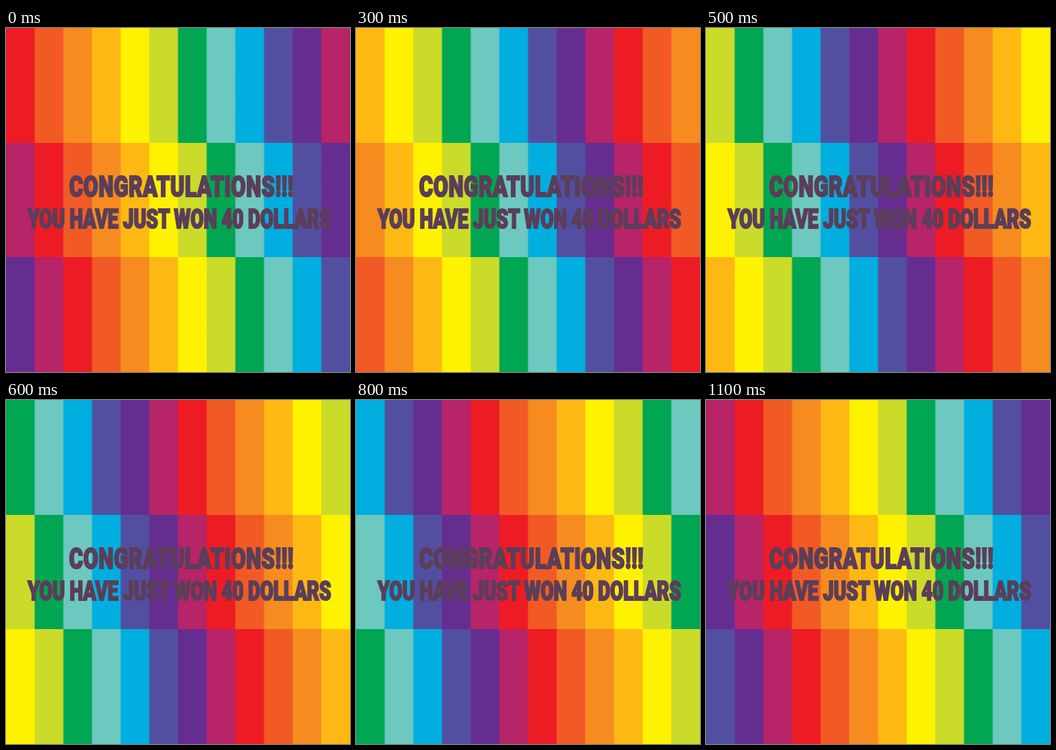
Write an HTML page with a canvas that moves like this. It is 500 by 500 pixels and loops after 1200 ms.

```html
<!DOCTYPE html>
<html lang="en">
<head>
<meta charset="utf-8">
<title>Congratulations</title>
<style>
  html, body { margin: 0; width: 100%; height: 100%; overflow: hidden; }
  canvas, svg { position: absolute; left: 0; top: 0; width: 500px; height: 500px; }
  text {
    font-family: Roboto, Inter, sans-serif;
    font-weight: 900;
    text-anchor: middle;
    fill: #5b3e59;
    stroke: #5b3e59;
    stroke-width: 2.2;
  }
  .title { font-size: 42.5px; letter-spacing: .65px; }
  .prize { font-size: 38px; letter-spacing: -.2px; }
</style>
</head>
<body>
<canvas width="500" height="500"></canvas>
<svg viewBox="0 0 500 500">
  <!-- one condensed style shared by both lines -->
  <text class="title" transform="translate(255 244.7) scale(.73 1)">CONGRATULATIONS!!!</text>
  <text class="prize" transform="translate(252 290.7) scale(.73 1)">YOU HAVE JUST WON 40 DOLLARS</text>
</svg>
<script>
  const colors = [
    '#ed1c24', '#f15a24', '#f68b1f', '#fdb813', '#fff200', '#cbdb2a',
    '#00a651', '#6dc8bf', '#00aedf', '#524fa1', '#662d91', '#b72467'
  ];
  const size = 500, rows = 3, count = colors.length, stepMs = 100;
  const soft = 1 / size; // half width of the blend between columns
  const ctx = document.querySelector('canvas').getContext('2d');
  const start = performance.now();
  let shown = -1;

  function stripes(shift) {
    const fill = ctx.createLinearGradient(0, 0, size, 0);
    for (let col = 0; col < count; col++) {
      const color = colors[(col + shift + count) % count];
      fill.addColorStop(col / count + soft, color);
      fill.addColorStop((col + 1) / count - soft, color);
    }
    return fill;
  }

  function paint(step) {
    for (let row = 0; row < rows; row++) {
      const y = Math.round(row * size / rows);
      ctx.fillStyle = stripes(step - row);
      ctx.fillRect(0, y, size, size - y);
    }
  }

  function tick() {
    const step = Math.floor((performance.now() - start) / stepMs) % count;
    if (step !== shown) paint(shown = step);
    requestAnimationFrame(tick);
  }
  tick();
</script>
</body>
</html>
```
